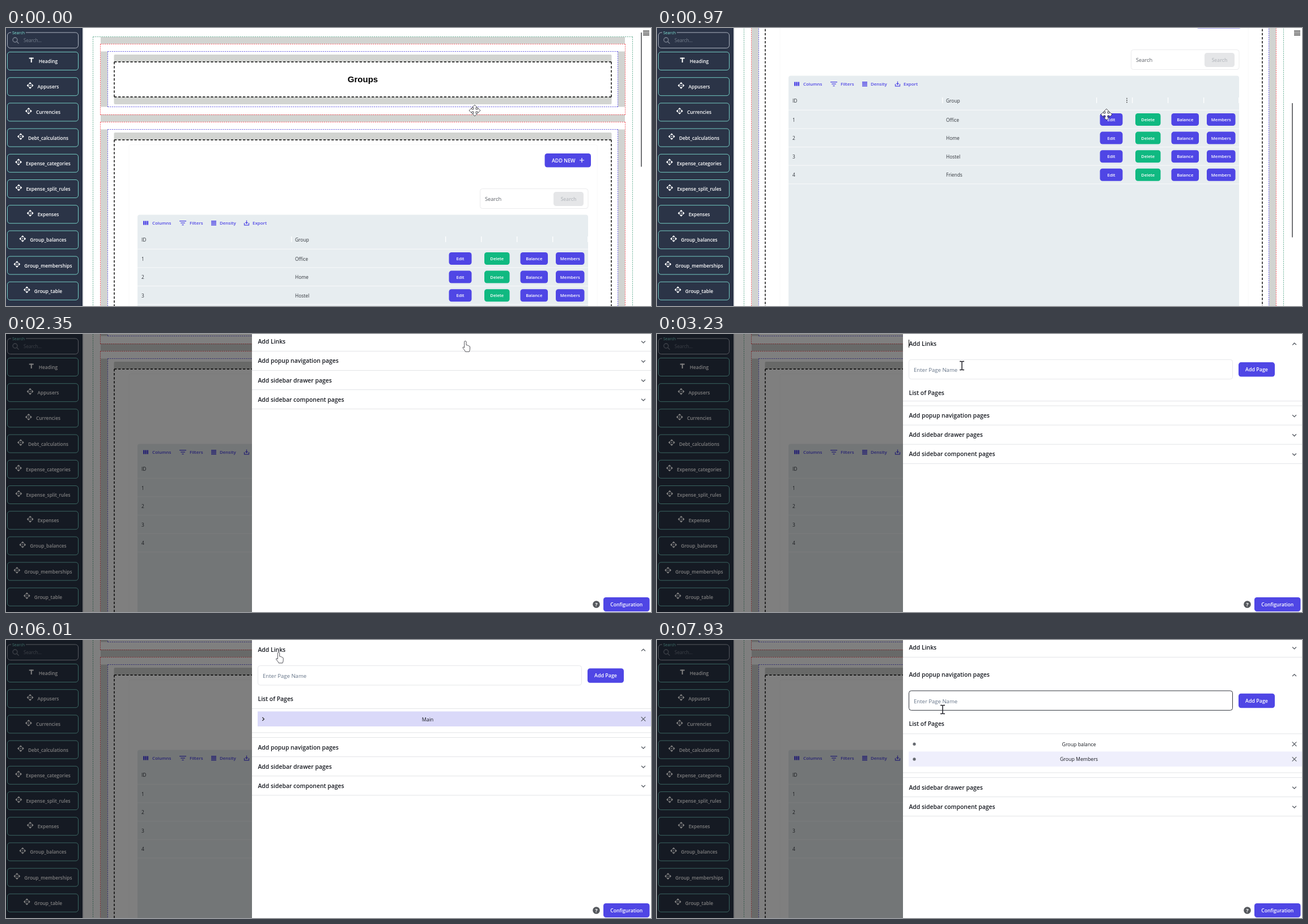
Recreate the animation shown at these times as an HTML page with a canvas. Size 1138 by 492 pixels, loop 8 s.

```html
<!DOCTYPE html>
<html lang="en">
<head>
<meta charset="utf-8">
<title>Page builder</title>
<style>
html, body { margin: 0; width: 100%; height: 100%; overflow: hidden; background: #fff; }
canvas { display: block; }
</style>
</head>
<body>
<canvas id="stage" width="1138" height="492"></canvas>
<script>
const W = 1138, H = 492, LOOP = 8000;
const INDIGO = '#4f46e5', GREEN = '#10b981', GRAY = '#d2d4d1', INK = '#15181f';
const ctx = document.getElementById('stage').getContext('2d');

// ---- timing ----
const ease = (t, from, to) => {
  const u = Math.min(1, Math.max(0, (t - from) / (to - from)));
  return u * u * (3 - 2 * u);
};
const scrollAt = t => 246 * ease(t, 70, 780) - 110 * ease(t, 1000, 1400);

// time, x, y, shape taken on arrival
const moves = [
  [0, 827, 146, 'move'], [70, 827, 146, 'move'], [780, 793, 153, 'move'],
  [1200, 793, 153, 'move'], [1660, 1122, 20, 'move'], [1730, 1122, 11, 'hand'],
  [2000, 1122, 11, 'hand'], [2690, 512, 14, 'hand'], [2950, 512, 14, 'hand'],
  [3220, 538, 56, 'beam'], [3400, 538, 56, 'beam'], [3820, 453, 138, 'hand'],
  [4300, 453, 138, 'hand'], [4490, 456, 141, 'hand'], [4900, 456, 141, 'hand'],
  [5460, 488, 67, 'beam'], [5750, 481, 22, 'hand'], [6350, 481, 22, 'hand'],
  [6770, 499, 63, 'hand'], [6970, 499, 63, 'hand'], [7040, 499, 60, 'hand'],
  [7400, 499, 60, 'hand'], [7860, 504, 123, 'beam'], [LOOP, 504, 123, 'beam']
];

// ---- drawing helpers ----
function text(str, x, y, size, color, weight = 400, align = 'left', family = '"Open Sans"') {
  ctx.font = `${weight} ${size}px ${family}, sans-serif`;
  ctx.textAlign = align;
  ctx.fillStyle = color;
  ctx.fillText(str, x, y + size * 0.36);
}
function rect(x, y, w, h, color) {
  ctx.fillStyle = color;
  ctx.fillRect(x, y, w, h);
}
function box(x, y, w, h, r, fill, stroke, width = 1) {
  ctx.beginPath();
  ctx.roundRect(x, y, w, h, r);
  if (fill) { ctx.fillStyle = fill; ctx.fill(); }
  if (stroke) { ctx.strokeStyle = stroke; ctx.lineWidth = width; ctx.stroke(); }
}
// Each side starts and ends with a whole dash, as CSS borders do.
function dashed(x, y, w, h, color, width = 0.75) {
  const dash = 3 * width;
  ctx.save();
  ctx.strokeStyle = color;
  ctx.lineWidth = width;
  const side = (x1, y1, x2, y2) => {
    const len = x2 - x1 + y2 - y1;
    const gaps = Math.round((len - dash) / (5 * width));
    ctx.setLineDash([dash, (len - dash) / gaps - dash]);
    ctx.beginPath();
    ctx.moveTo(x1, y1);
    ctx.lineTo(x2, y2);
    ctx.stroke();
  };
  side(x, y, x + w, y);
  side(x, y + h, x + w, y + h);
  side(x, y, x, y + h);
  side(x + w, y, x + w, y + h);
  ctx.restore();
}
function stroke(d, x, y, color, width = 1, angle = 0) {
  ctx.save();
  ctx.translate(x, y);
  ctx.rotate(angle);
  ctx.strokeStyle = color;
  ctx.lineWidth = width;
  ctx.stroke(new Path2D(d));
  ctx.restore();
}
function button(label, x, y, w, h, size, color = INDIGO, ink = '#fff') {
  box(x, y, w, h, 4.5, color);
  text(label, x + w / 2, y + h / 2 + 0.3, size, ink, 600, 'center');
}
function dot(x, y, r, color) {
  ctx.fillStyle = color;
  ctx.beginPath();
  ctx.arc(x, y, r, 0, 7);
  ctx.fill();
}

// ---- sidebar ----
const tables = ['Heading', 'Appusers', 'Currencies', 'Debt_calculations', 'Expense_categories',
  'Expense_split_rules', 'Expenses', 'Group_balances', 'Group_memberships', 'Group_table'];
const arm = 'M0-6 2.1-3.9 4.6-6.4 0-11-4.6-6.4-2.1-3.9z';

function widgetIcon(x, y) {
  ctx.save();
  ctx.translate(x, y);
  ctx.scale(0.54, 0.54);
  ctx.fillStyle = '#fff';
  ctx.fill(new Path2D('M0-2 2 0 0 2-2 0z'));
  for (let i = 0; i < 4; i++) {
    ctx.fill(new Path2D(arm));
    ctx.rotate(Math.PI / 2);
  }
  ctx.restore();
}
function sidebar() {
  const bg = '#2b3447', teal = '#81e6d9';
  rect(0, 0, 135, H, bg);
  rect(135, 0, 2, H, '#dcdee1');
  box(2.5, 8, 125, 27.5, 5, null, '#c5ccd6', 0.85);
  rect(9, 5, 26, 6, bg);
  text('Search', 11, 8, 7, teal);
  stroke('M2.2 2.2 5.6 5.6M3-1a4 4 0 1 1-8 0a4 4 0 1 1 8 0', 17, 22, '#7d8593', 1.3);
  text('Search...', 31, 22.5, 8.1, '#78818f');
  tables.forEach((name, i) => {
    const y = 58.5 + 45.2 * i;
    box(2.5, y - 16, 125, 32, 4.5, null, teal, 0.85);
    text(name, 74.5, y + 0.5, 8.4, '#fff', 600, 'center');
    const x = 74.5 - ctx.measureText(name).width / 2 - 13;
    if (i) widgetIcon(x, y - 2);
    else {
      rect(x - 4, y - 6, 8, 2, '#fff');
      rect(x - 1, y - 6, 2, 8.5, '#fff');
    }
  });
}

// ---- page canvas ----
function frames() {
  dashed(153.5, 15.5, 952, 900, '#3f9a78');
  rect(167, 16, 925, 12, GRAY);
  rect(167, 153, 925, 13, GRAY);
  for (const [y, h, inner] of [[28.5, 125, 62], [166.5, 800, 700]]) {
    for (const x of [167, 1080]) rect(x, y + 13, 12, h - 27, GRAY);
    dashed(166.5, y, 926, h, '#f5303a');
    dashed(179.5, y + 13, 900, h - 27, '#3a2fd8');
    box(190.5, y + 18.5, 878, 13, 2, GRAY);
    box(190.5, y + 31.5 + inner, 878, 13, 2, GRAY);
    box(191, y + 31.5, 877, inner, 3, '#fff');
    dashed(191, y + 31.5, 877, inner, '#000', 1.42);
  }
  text('Groups', 629.5, 91, 15, '#000', 700, 'center', '"Liberation Sans"');
}
function toolbar(y) {
  for (let i = 0; i < 3; i++) {
    rect(242 + 3.3 * i, y - 3.5, 2.5, 7, INDIGO);
    rect(306 + 2.2 * i, y - 4 + 3.4 * i, 12 - 4.4 * i, 1.3, INDIGO);
  }
  for (let i = 0; i < 4; i++) rect(362, y - 4 + 2.3 * i, 9, 1.5, INDIGO);
  stroke('M-4 0v3.8h8V0M0-4.5V1M-2-1 0 1 2-1', 424.5, y, INDIGO, 1.2);
  [['Columns', 258], ['Filters', 324], ['Density', 377], ['Export', 435]]
    .forEach(([s, x]) => text(s, x, y + 0.3, 7.9, INDIGO, 600));
}
function page(t) {
  const s = scrollAt(t);
  ctx.save();
  ctx.translate(0, -s);
  frames();
  box(217, 206.5, 826, 690, 3, null, '#f8f8f8');
  button('', 950.5, 222, 81.5, 24.5, 9);
  text('ADD NEW', 963, 234.5, 8.9, '#fff', 600);
  stroke('M-4 0H4M0-4V4', 1016, 234, '#fff', 1.2);
  box(836.5, 284.5, 190.5, 35, 4, '#fff', '#ebebed');
  text('Search', 845, 302.5, 9.3, '#5b5f66');
  button('Search', 966, 290, 53, 25, 8.5, '#e5e6e8', '#b9bcc1');

  box(232, 330.5, 795, 600, 4, '#e7edf0');
  toolbar(345);
  text('ID', 239, 374.5, 8.5, '#30343a');
  text('Group', 510, 374.5, 8.4, '#30343a');
  for (const x of [503, 775, 838, 901, 964, 1026]) rect(x, 369, 1.3, 10, '#fff');
  if (t > 850 && t < 1150) for (let i = -1; i < 2; i++) dot(829, 374 + 3.4 * i, 0.9, '#444');
  rect(232, 390.8, 795, 1, '#f8fafb');
  ['Office', 'Home', 'Hostel', 'Friends'].forEach((name, i) => {
    const y = 408 + 32.6 * i;
    text(i + 1, 239, y + 0.5, 8.4, '#30343a');
    text(name, 510, y + 0.5, 8.4, '#30343a');
    button('Edit', 781.5, y - 11, 40, 22, 7.65);
    button('Delete', 844, y - 11, 44.5, 22, 7.65, GREEN);
    button('Balance', 907.5, y - 11, 48.5, 22, 7.65);
    button('Members', 970, y - 11, 50.5, 22, 7.65);
    rect(232, y + 15.5, 795, 1, '#f8fafb');
  });
  ctx.restore();

  rect(1120.4, 8 + s * 0.508, 1.2, 237.5, '#16181d');
  if (t > 1660) dot(1128, 9, 11, 'rgba(0,0,0,.04)');
  for (const y of [4.8, 8.2, 11.6]) rect(1124, y, 11, 1.4, '#111');
}

// ---- drawer ----
const cross = (x, y) => stroke('M-3.8-3.8 3.8 3.8M-3.8 3.8 3.8-3.8', x, y, '#555a62', 1.1);
const line = y => rect(434, y - 0.5, 704, 1, '#e3e4e7');

function linkList(y, open) {
  rect(444, y + 5, 694, 26.5, '#dad9f9');
  stroke('M-1.7-3 1.3 0-1.7 3', 454, y + 18.5, '#222', 1.3, open * Math.PI / 2);
  text('Main', 744, y + 19, 8.9, INK, 400, 'center');
  cross(1124.5, y + 18.5);
  if (!open) return;
  ctx.globalAlpha = open;
  dot(464.5, y + 44.5, 2.6, '#666a70');
  text('Groups', 474.5, y + 45.5, 9.4, INK);
  cross(1124.5, y + 44.5);
  ctx.globalAlpha = 1;
}
function popupList(y) {
  rect(444, y + 31.5, 694, 26.5, '#efeffc');
  ['Group balance', 'Group Members'].forEach((name, i) => {
    const row = y + 18.3 + 26.7 * i;
    dot(454, row, 2.6, '#666a70');
    text(name, 744.5, row + 0.3, 8.75, INK, 400, 'center');
    cross(1124.5, row);
  });
}
function sectionBody(mid, end, focus, list) {
  ctx.save();
  ctx.beginPath();
  ctx.rect(434, mid + 17, 704, Math.max(0, end - mid - 17));
  ctx.clip();
  box(444.5, mid + 28.5, 571, 34.5, 4, '#fff', focus ? '#33373f' : '#e6e7ea');
  text('Enter Page Name', 453, mid + 46.8, 9.55, '#647387');
  button('Add Page', 1026, mid + 33.3, 64, 25.5, 8.9);
  text('List of Pages', 444.5, mid + 87, 10.4, INK, 600);
  line(mid + 104.5);
  list(mid + 104.5);
  ctx.restore();
}
function drawer(t) {
  const shown = ease(t, 1990, 2240);
  if (!shown) return;
  rect(0, 0, W, H, `rgba(0,0,0,${0.5 * shown})`);
  ctx.save();
  ctx.translate(704 * (1 - shown), 0);
  rect(434, 0, 704, H, '#fff');

  const loaded = ease(t, 3260, 3540);
  const sub = ease(t, 3960, 4180) - ease(t, 4900, 5120);
  const sections = [
    { title: 'Add Links', open: ease(t, 2970, 3260) - ease(t, 6190, 6490),
      size: 42.5 * loaded + 19.5 * sub, list: y => linkList(y, sub) },
    { title: 'Add popup navigation pages', open: ease(t, 7240, 7540),
      size: 69, list: popupList, focus: t > 7780 },
    { title: 'Add sidebar drawer pages', open: 0 },
    { title: 'Add sidebar component pages', open: 0 }
  ];
  let y = -3.7;
  sections.forEach(({ title, open, size, list, focus }, i) => {
    if (i) y += 10.4 * open;
    const mid = y + 17 + 3.6 * open;
    const end = mid + 17.1 + open * (87.4 + (size || 0));
    if (open) sectionBody(mid, end, focus, list);
    text(title, 444.5, mid + 0.3, 10.4, INK, 600);
    stroke('M-3.4-1.7 0 1.7 3.4-1.7', 1124.5, mid + 0.9, '#555a62', 1.3, open * Math.PI);
    line(end);
    y = end + 8.6 * open;
    if (open) line(y);
  });
  if (t > 2900 && t < 3620) rect(444, 10, 1, 14, '#111');

  dot(1041.5, 478.5, 6.3, '#55585d');
  text('?', 1041.5, 478.8, 9.5, '#fff', 700, 'center');
  button('Configuration', 1054, 466, 81.5, 25, 8.6);
  ctx.restore();
}

// ---- pointer ----
const shapes = {
  move: 'M2-2V-5.2H4.6L0-10-4.6-5.2H-2V-2H-5.2V-4.6L-10 0-5.2 4.6V2H-2V5.2H-4.6L0 10 4.6 5.2H2V2H5.2V4.6L10 0 5.2-4.6V-2z',
  hand: 'M-1.7 1.6a1.7 1.7 0 0 1 3.4 0V7l1.4.2q1.3.2 1.5.6q1.4 0 1.7.9q1.9.1 1.9 1.9v3.2q0 2-1.3 5H.2q-1-2.6-4-5.8q-1.2-1.6-.2-2.3q.9-.5 2.3 1z',
  beam: 'M-4-7.5H-1.2L0-6.8 1.2-7.5H4M0-7V7M-4 7.5H-1.2L0 6.8 1.2 7.5H4'
};
function pointer(t) {
  const i = moves.findIndex((m, k) => k && t < m[0]);
  const a = moves[i - 1], b = moves[i];
  const u = ease(t, a[0], b[0]);
  const shape = (u < 0.7 ? a : b)[3];
  const x = a[1] + (b[1] - a[1]) * u, y = a[2] + (b[2] - a[2]) * u;
  if (shape !== 'beam') {
    ctx.save();
    ctx.translate(x, y);
    ctx.fillStyle = '#fff';
    ctx.fill(new Path2D(shapes[shape]));
    ctx.restore();
  }
  stroke(shapes[shape], x, y, '#1c1c24', shape === 'beam' ? 1.5 : 0.75);
}

function draw(now) {
  const t = now % LOOP;
  rect(0, 0, W, H, '#fff');
  page(t);
  sidebar();
  drawer(t);
  pointer(t);
}
let start;
function tick(now) {
  start ??= now;
  draw(Math.max(0, now - start));
  requestAnimationFrame(tick);
}
requestAnimationFrame(tick);
</script>
</body>
</html>
```
